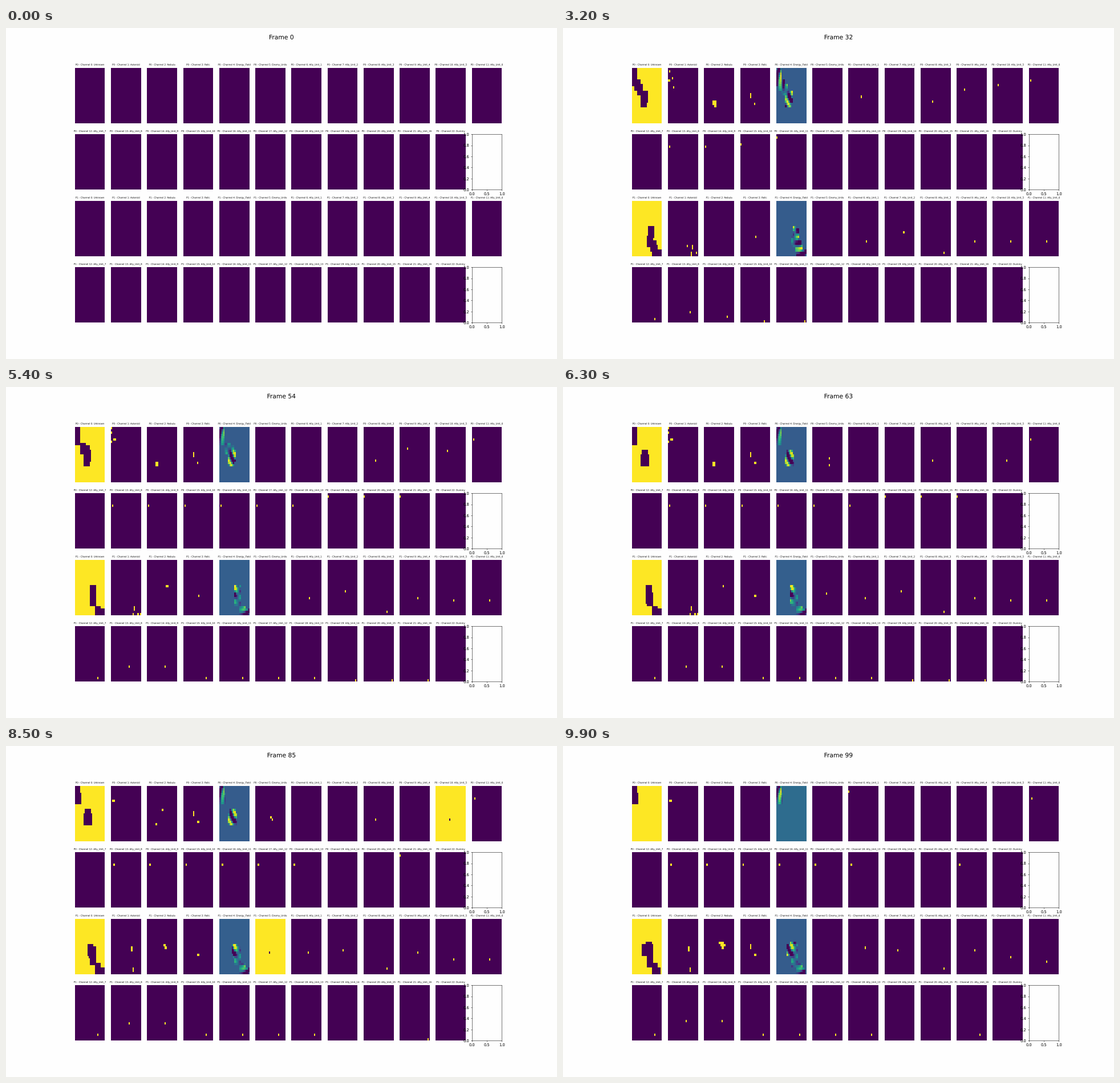
Recreate the animation shown at these times as a matplotlib script. Size 966 by 580 pixels, loop 10 s.

```python
import matplotlib.pyplot as plt
import numpy as np
from matplotlib.animation import FuncAnimation
from matplotlib.patches import PathPatch
from matplotlib.textpath import TextPath
from matplotlib.transforms import Affine2D

W, H, DPI, N = 966, 580, 48, 24
STEPS = 100
PT = 48.3 / 72  # pixels per point
PAPER = "#fefefe"
plt.rcParams.update({"font.family": "DejaVu Sans", "text.hinting": "none"})

yy, xx = np.mgrid[:N, :N]

NAMES = ["Unknown", "Asteroid", "Nebula", "Relic", "Energy_Field", "Enemy_Units"]
NAMES += [f"Ally_Unit_{i}" for i in range(1, 17)] + ["Dummy"]

# Rectangles x, y, w, h; each also appears mirrored over the antidiagonal
ASTEROIDS = [(1, 1, 1, 1), (3, 4, 2, 1), (0, 5, 2, 1), (1, 23, 1, 1),
             (4, 8, 1, 1), (12, 4, 2, 2)]
NEBULAE = [(7, 14, 3, 2), (14, 8, 4, 1), (15, 9, 4, 1), (16, 10, 2, 1)]
RELICS = [(8, 11, 1, 2)]

# Meeting points, seen from a home at (0, 0)
GATE, RALLY, POST, NEW_POST = (0, 4), (6, 9), (1, 5), (2, 5)
OPEN, ROAM, SHIFT = 19, 39, 80


def mirror(x, y):
    return 23 - y, 23 - x


def walk(a, b, k):
    """Take k steps from a to b, about three in five of them sideways."""
    dx, dy = b[0] - a[0], b[1] - a[1]
    k = min(k, abs(dx) + abs(dy))
    mx = max(k - abs(dy), min(abs(dx), round(0.6 * k)))
    return a[0] + int(np.sign(dx)) * mx, a[1] + int(np.sign(dy)) * (k - mx)


class Unit:
    """Follows legs of (start, goal, speed); its energy fades after `dim`."""

    def __init__(self, slot, legs, born=None, dim=STEPS, sour=STEPS, end=STEPS):
        self.slot = slot
        self.born = 3 * slot + 1 if born is None else born
        self.legs = [(max(start, self.born), goal, speed)
                     for start, goal, speed in legs]
        self.dim, self.sour, self.end = dim, sour, end

    def alive(self, t):
        return self.born <= t < self.end

    def energy(self, t):
        return -1.65 if t >= self.sour else float(t < self.dim)

    def cell(self, t):
        pos = (0, 0)
        for start, goal, speed in self.legs:
            if t > start:
                pos = walk(pos, goal, int((t - start) * speed + 1e-6))
        return pos


def rover(slot, rally, goal=None, done=99, **life):
    """Heads straight out, then drifts on to its goal."""
    goal = goal or rally
    far = abs(goal[0] - rally[0]) + abs(goal[1] - rally[1])
    return Unit(slot, [(0, rally, 1), (ROAM, goal, far / (done - ROAM))], **life)


def scout(slot, goal=RALLY, **life):
    """Waits at the gate, joins the rally, then drifts on to its goal."""
    far = abs(goal[0] - RALLY[0]) + abs(goal[1] - RALLY[1])
    out = max(OPEN, 3 * slot + 5)
    return Unit(slot, [(0, GATE, 1), (out, RALLY, 1),
                       (ROAM, goal, far / (99 - ROAM))], **life)


def guards(slots):
    return [Unit(s, [(0, GATE, 1), (max(OPEN, 3 * s + 5), POST, 1),
                     (SHIFT, NEW_POST, 1)]) for s in slots]


def recruits():
    idle = [Unit(s, [(0, (0, 1), 1), (SHIFT, (0, 3), 1)], dim=SHIFT)
            for s in (13, 14)]
    return idle + [Unit(15, [(0, (0, 1), 1), (SHIFT + 5, NEW_POST, 1)])]


TEAMS = [
    [rover(0, (10, 12), dim=40, end=96), Unit(0, [(0, (0, 2), 1)], born=97),
     Unit(1, [(0, (1, 0), 1)], dim=32),
     rover(2, (9, 14), end=96), scout(3, end=55),
     rover(4, (4, 7), (11, 14), done=63, dim=70, sour=85, end=96),
     *guards([5, *range(7, 13)]), *recruits()],
    [scout(0, (11, 10)), rover(1, (10, 8), (10, 13)), scout(3, (10, 9)),
     scout(4, (7, 9)), scout(5, (5, 9)), scout(7, (8, 9)), scout(8, (8, 9)),
     *guards([2, 6, *range(9, 13)]), *recruits()],
]


def tiles(rects, drift=0):
    grid = np.zeros((N, N))
    for x, y, w, h in rects:
        for i in range(x, x + w):
            for j in range(y, y + h):
                for a, b in ((i, j), mirror(i, j)):
                    grid[(b + drift) % N, (a - drift) % N] = 1
    return grid


def energy_field(t):
    """Ripples around two mirrored nodes that drift once."""
    node = (14, 5) if t < 33 else (14, 6)
    waves = sum(4 * np.sin(1.2 * np.hypot(xx - x, yy - y) + 1)
                for x, y in (node, mirror(*node)))
    return np.maximum(waves + 0.7, -3.5)


def observe(t):
    """All 2 x 23 channel grids at step t."""
    drift = t // 40
    world = [tiles(ASTEROIDS, drift), tiles(NEBULAE, drift), tiles(RELICS),
             energy_field(t)]
    allies = np.zeros((2, 16, N, N))
    seen = np.zeros((2, N, N))
    for p, team in enumerate(TEAMS):
        for u in team:
            if u.alive(t):
                x, y = mirror(*u.cell(t)) if p else u.cell(t)
                allies[p, u.slot, y, x] = u.energy(t)
                seen[p, max(y - 2, 0):y + 3, max(x - 2, 0):x + 3] = 1
    grids = []
    for p in range(2):
        enemy = allies[1 - p].sum(axis=0)
        grids.append(1 - seen[p])
        grids += [layer * seen[p] for layer in world + [enemy]]
        grids += [*allies[p], np.zeros((N, N))]
    return grids


fig = plt.figure(figsize=(W / DPI, H / DPI), dpi=DPI, facecolor=PAPER)
stage = fig.add_axes([0, 0, 1, 1])
stage.axis("off")

# Default subplot margins and gaps for 4 rows of 12
left, top = 0.125 * W, 0.12 * H
pw = 0.775 * W / (12 + 0.2 * 11)
ph = 0.77 * H / (4 + 0.2 * 3)


def corner(row, col):
    return left + 1.2 * pw * col, top + 1.2 * ph * row


def lettering(text, size, x, y):
    """Outline of a line of text centred on x with its baseline at y."""
    path = TextPath((0, 0), text, size=size * PT)
    box = path.get_extents()
    place = Affine2D().translate(-(box.x0 + box.x1) / 2, 0).scale(1, -1)
    return place.translate(x, y).transform_path(path)


def write(*args):
    return stage.add_patch(PathPatch(lettering(*args), fc="black", lw=0))


images = []
for p in range(2):
    for c, name in enumerate(NAMES):
        x, y = corner(2 * p + c // 12, c % 12)
        x0, x1, y0, y1 = np.round([x, x + pw, y, y + ph])
        images.append(stage.imshow(
            np.zeros((N, N)), cmap="viridis", interpolation="nearest",
            aspect="auto", extent=(x0, x1, y1, y0)))
        write(f"P{p} - Channel {c}: {name}", 6, x + pw / 2, y - 6 * PT)
    x, y = corner(2 * p + 1, 11)
    empty = fig.add_axes([x / W, 1 - (y + ph) / H, pw / W, ph / H],
                         facecolor=PAPER)
    empty.tick_params(labelsize=10.06)

HEADING = (16, W / 2, 0.02 * H + 0.76 * 16 * PT)
heading = write("Frame 0", *HEADING)
stage.set(xlim=(0, W), ylim=(H, 0))


def update(t):
    heading.set_path(lettering(f"Frame {t}", *HEADING))
    for im, grid in zip(images, observe(t)):
        im.set_data(grid)
        im.set_clim(grid.min(), grid.max())
    return [heading, *images]


anim = FuncAnimation(fig, update, frames=STEPS, init_func=lambda: update(0),
                     interval=100, repeat=True, repeat_delay=0, blit=False)
plt.show()
```
